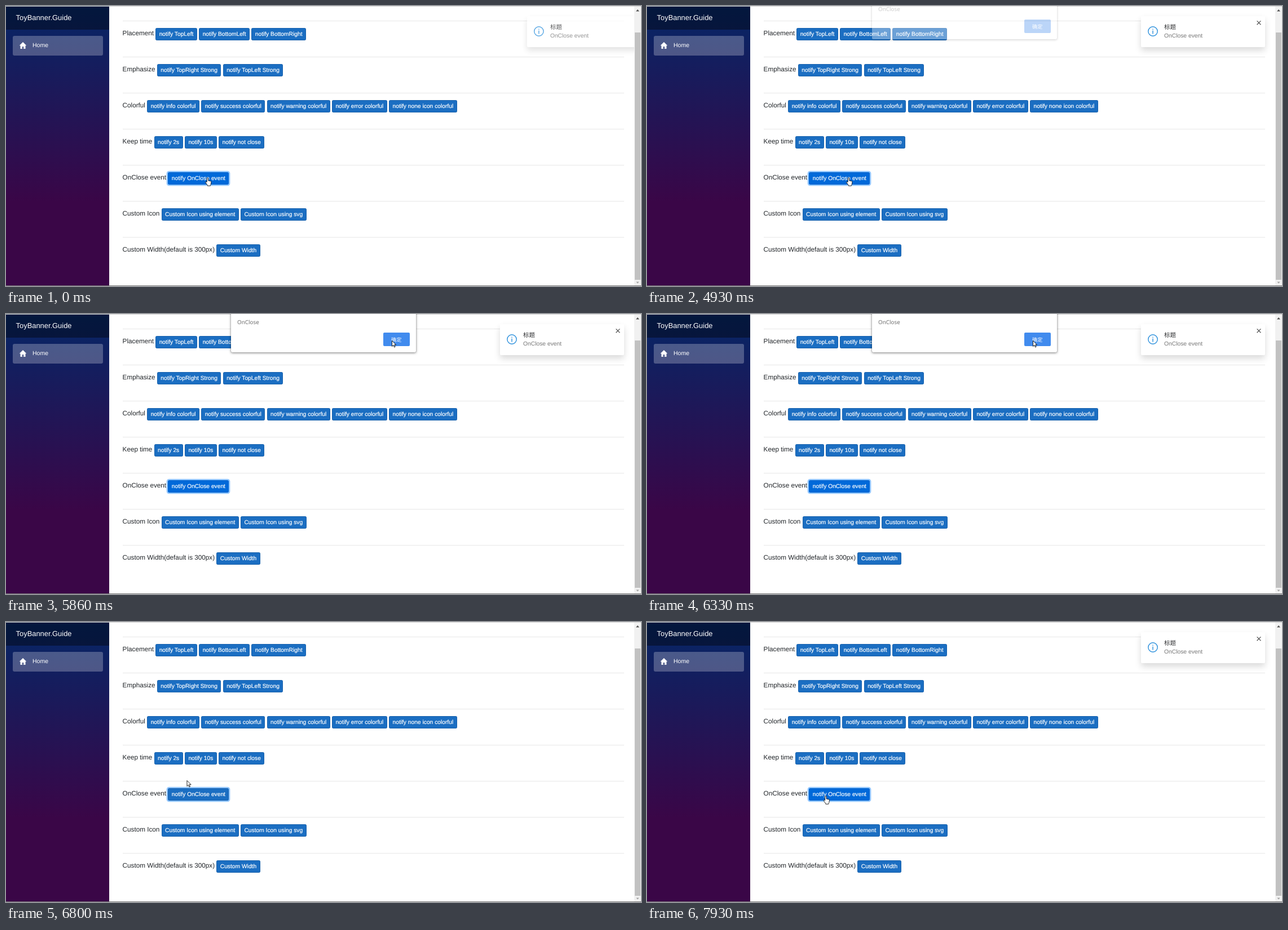
An HTML page for the animation above (8000 ms loop, 1126 px wide and 497 px high).

```html
<!DOCTYPE html>
<html lang="en">
<head>
<meta charset="utf-8">
<title>Notification demo</title>
<style>
  html, body { margin: 0; width: 100%; height: 100%; overflow: hidden; background: #fff; }
  body {
    position: relative;
    font: 11.73px "Liberation Sans", Arial, sans-serif;
    color: #212529;
    text-rendering: geometricPrecision;
    white-space: nowrap;
  }
  .page, .side, .brand, .home, .row, .notice, .notice *, .dialog, .dialog *, .bar, .thumb, .edge, .cursor { position: absolute; }
  .page { left: 0; top: 0; width: 1114px; height: 497px; overflow: hidden; }

  .side { left: 0; top: 0; width: 183px; height: 497px; background: linear-gradient(#052767, #3a0647 70%); color: #fff; }
  .brand { left: 0; right: 0; top: 0; height: 42px; padding-left: 17.6px; background: rgba(0,0,0,.4); font-size: 12.9px; line-height: 42px; }
  .home { left: 12px; top: 53px; width: 125px; height: 35px; padding-left: 35px; border-radius: 3px; background: rgba(255,255,255,.25); font-size: 10.56px; line-height: 34.5px; }
  .home svg { position: absolute; left: 11px; top: 10px; }

  .row { left: 206.6px; width: 889.4px; height: 48px; border-top: 1px solid #e7e7e7; display: flex; gap: 3.2px; }
  .row span { line-height: 22.6px; margin-top: 10.6px; }
  .row b {
    box-sizing: border-box; height: 22.7px; margin-top: 11.6px; padding: 0 5.5px;
    border: 1px solid #1861ac; border-radius: 2.3px; background: #1b6ec2;
    color: #fff; font-weight: 400; font-size: 10.26px; line-height: 21px;
    -webkit-text-stroke: .2px;
  }
  .row b.focus { box-shadow: 0 0 0 2.35px #93c7ff; }
  .row b.hover { background: #0069d9; border-color: #0062cc; }

  .notice { left: 876px; top: 18px; width: 220px; height: 55px; border-radius: 2px; background: #fff; box-shadow: 0 5.9px 11.7px rgba(0,0,0,.15); font-size: 10.3px; }
  .notice svg { left: 0; top: 0; }
  .notice .title { left: 41px; top: 12px; line-height: 15px; color: #303133; font-family: "Noto Sans CJK SC", "Noto Sans CJK", sans-serif; font-size: 10.5px; }
  .notice .text { left: 41px; top: 28px; line-height: 15px; color: #777; }

  .dialog { left: 398.5px; top: -20px; width: 328.5px; height: 88px; border-radius: 2px; background: #fff; box-shadow: 0 0 1px rgba(0,0,0,.55), 0 1px 4px rgba(0,0,0,.5); }
  .dialog .text { left: 11.5px; top: 26px; font: 9.9px/16px "Open Sans", sans-serif; color: #666; }
  .dialog .ok { left: 270px; top: 53px; width: 47.5px; height: 24px; border-radius: 2px; background: #418bee; color: #fff; text-align: center; font: 500 9.2px/24px "Noto Sans CJK SC", "Noto Sans CJK", sans-serif; }

  .bar { left: 1114px; top: 0; width: 12px; height: 497px; background: #f1f1f1; }
  .thumb { left: 1px; top: 47px; width: 10px; height: 439px; background: #c1c1c1; }
  .bar svg { position: absolute; left: 0; top: 0; }
  .edge { left: 0; right: 0; height: 1px; }
  .cursor { left: 0; top: 0; overflow: visible; }
  .cursor path { fill: #fff; stroke: #111; stroke-width: .9; stroke-linejoin: round; }
  .cursor .arrow, .cursor.pointing .hand { display: none; }
  .cursor.pointing .arrow { display: inline; }
</style>
</head>
<body>
<div class="page">
  <div class="side">
    <div class="brand">ToyBanner.Guide</div>
    <div class="home">
      <svg width="14" height="14" fill="#fff"><path d="M7 1 .7 7.2h1.8V13h3.3V9h2.4v4h3.3V7.2h1.8z"/></svg>Home
    </div>
  </div>
  <main></main>
  <div class="notice">
    <svg width="220" height="55" fill="none">
      <g stroke="#2a8fdc" stroke-width="1.4"><circle cx="21" cy="27" r="8.2"/><path d="M21 25.6v5.8M21 22.4v1.7"/></g>
      <path d="m205.6 8.4 6.8 6.8m0-6.8-6.8 6.8" stroke="#555" stroke-width="1.3"/>
    </svg>
    <div class="title">标题</div>
    <div class="text">OnClose event</div>
  </div>
</div>
<div class="bar">
  <div class="thumb"></div>
  <svg width="12" height="497"><path d="m3 9.5 3-3.5 3 3.5z" fill="#505050"/><path d="M3.4 489.5h5.2L6 492.5z" fill="#a3a3a3"/></svg>
</div>
<div class="edge" style="top:0;background:#d2d2d2"></div>
<div class="edge" style="bottom:0;background:#777"></div>
<div class="dialog">
  <div class="text">OnClose</div>
  <div class="ok">确定</div>
</div>
<svg class="cursor" width="1" height="1">
  <path class="hand" d="M-1.3 7.5V.9a1.2 1.2 0 0 1 2.4 0v4l4.2.9q1.2.4 1.1 1.7l-.6 4-.9 1.8v.9H-.2v-1L-3.6 8.4q-.4-1.4.8-1.3z"/>
  <path class="arrow" d="M0 0v10l2.4-2.2 1.6 3.7 1.6-.7-1.6-3.6h3.2z"/>
</svg>
<script>
const $ = selector => document.querySelector(selector);
const rows = [
  ['Placement', 'notify TopLeft', 'notify BottomLeft', 'notify BottomRight'],
  ['Emphasize', 'notify TopRight Strong', 'notify TopLeft Strong'],
  ['Colorful', 'notify info colorful', 'notify success colorful', 'notify warning colorful', 'notify error colorful', 'notify none icon colorful'],
  ['Keep time', 'notify 2s', 'notify 10s', 'notify not close'],
  ['OnClose event', 'notify OnClose event'],
  ['Custom Icon', 'Custom Icon using element', 'Custom Icon using svg'],
  ['Custom Width(default is 300px)', 'Custom Width'],
];
$('main').innerHTML = rows.map(([label, ...buttons], i) =>
  `<div class="row" style="top:${26 + 64 * i}px"><span>${label}</span>` +
  buttons.map(text => `<b${label === 'OnClose event' ? ' class="focus"' : ''}>${text}</b>`).join('') + '</div>').join('');

const notice = $('.notice'), dialog = $('.dialog'), cursor = $('.cursor'), button = $('.focus');
const LOOP = 8000, TICK = 1000 / 15;

// Progress from 0 to 1 over a span of the loop, in ms.
const ramp = (t, start, length) => Math.min(1, Math.max(0, (t - start) / length));
const smooth = p => p * p * (3 - 2 * p);
const curve = (a, bend, b, u) => a.map((v, i) => v * (1 - u) ** 2 + 2 * bend[i] * u * (1 - u) + b[i] * u * u);
const shift = (el, x, y) => { el.style.transform = `translate(${x}px, ${y}px)`; };

const pressed = [357.5, 305], confirm = [684.5, 47.5], again = [317, 309];

function pose(t) {
  // The notice is sliding in when the loop begins, and a new one follows near its end.
  const away = ((1 - ramp(t, -150, 300)) * (1 - ramp(t, 7711, 300))) ** 2.2;
  const shown = t < 7000 ? 1 - ramp(t, 6400, 200) : ramp(t, 7711, 1);
  shift(notice, 220 * away, 0);
  notice.style.opacity = (1 - away) * shown;

  const open = ramp(t, 4870, 180);
  shift(dialog, 0, -14 * (1 - open));
  dialog.style.opacity = open * (1 - ramp(t, 6400, 130));

  const [x, y] = t < 6600
    ? curve(pressed, [480, 146], confirm, smooth(ramp(t, 5050, 700)))
    : curve(confirm, [300, 224], again, smooth(ramp(t, 6630, 225)));
  shift(cursor, x, y);
  cursor.classList.toggle('pointing', t > 5600 && t < 6830);
  button.classList.toggle('hover', t < 6500 || t > 6830);
}

// The motion advances at 15 pictures per second.
const start = performance.now();
function draw() {
  const elapsed = (performance.now() - start) % LOOP;
  pose(Math.floor((elapsed + 4) / TICK) * TICK % LOOP);
  requestAnimationFrame(draw);
}
draw();
</script>
</body>
</html>
```
